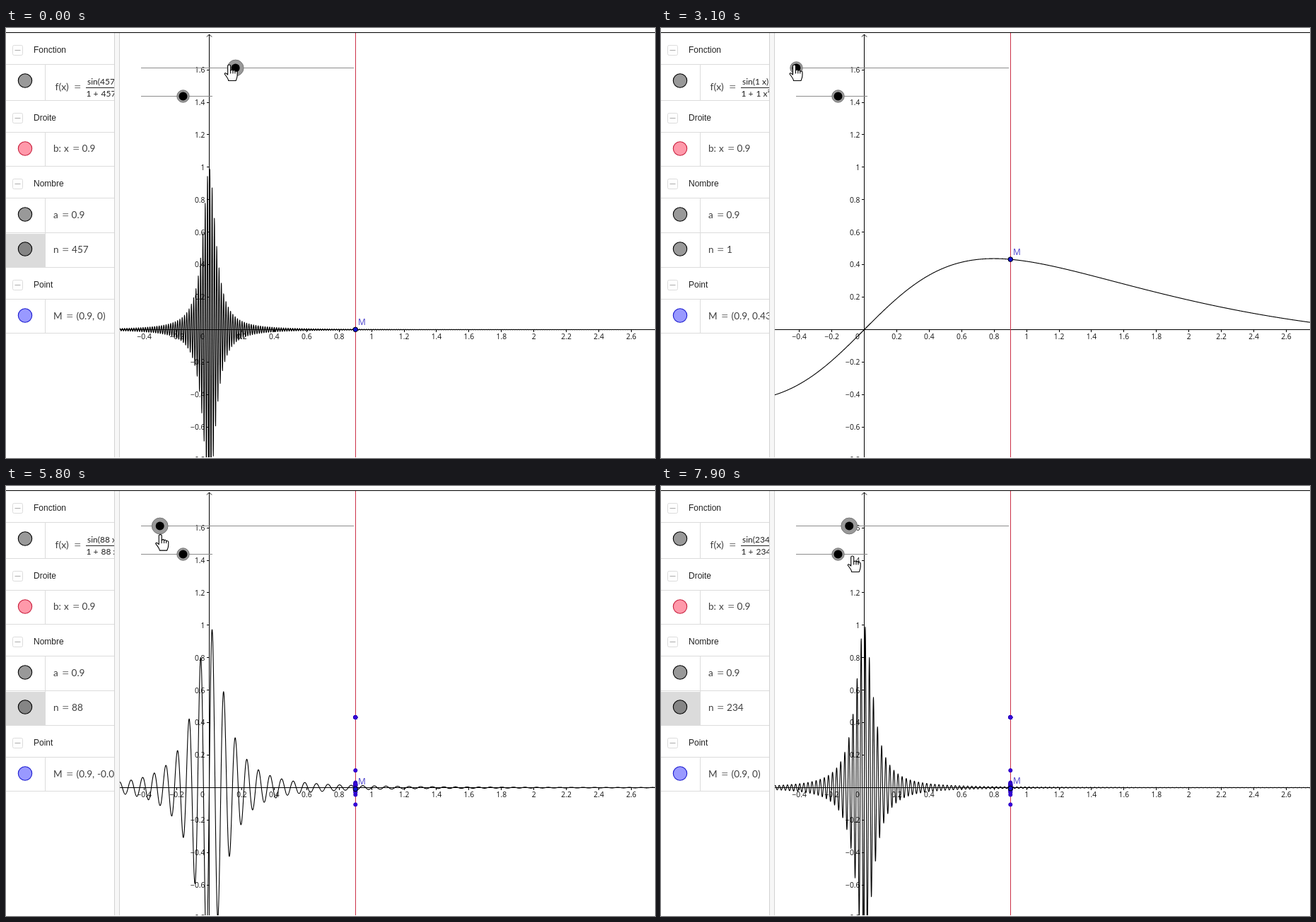
Write an HTML page that moves like this. It is 918 px wide and 608 px high and loops after 8000 ms.

```html
<!DOCTYPE html>
<html lang="fr">
<head>
<meta charset="utf-8">
<title>Suite de fonctions</title>
<style>
  html, body { margin: 0; width: 100%; height: 100%; overflow: hidden; background: #fff; }
  svg { display: block; width: 918px; height: 608px; }
  .title { font: 12px "Liberation Sans", Arial, sans-serif; fill: #222; }
  .math { font: 13.6px Lato, sans-serif; fill: #404040; }
  .frac { font: 12px Lato, sans-serif; fill: #222; }
  .eq { font-size: 18px; fill: #808080; }
  .tick { font: 10.3px "Open Sans", sans-serif; fill: #111; }
  .label { font: 12px "Open Sans", sans-serif; fill: #4a40cc; }
  .rule { stroke: #dcdcdc; fill: none; }
  .axis { stroke: #000; fill: none; }
  .rail { stroke: #8c8c8c; }
  .ring { fill: #999; stroke: #777; }
</style>
</head>
<body>
<svg viewBox="0 0 918 608">
  <defs>
    <clipPath id="paneClip"><rect y="7" width="153" height="600"/></clipPath>
    <clipPath id="plotClip"><rect x="161" y="7" width="757" height="600"/></clipPath>
  </defs>

  <g clip-path="url(#paneClip)">
    <rect id="mark" width="55" fill="#dbdbdb"/>
    <g id="rows"></g>
    <g class="math">
      <text x="69.5" y="88" font-size="14">f(x)</text><text class="eq" x="96" y="89">=</text>
      <text x="67" y="175">b:</text><text x="82" y="175">x</text>
      <text class="eq" x="94" y="176">=</text><text x="107.5" y="175">0.9</text>
      <text x="67" y="269">a</text><text class="eq" x="79" y="270">=</text><text x="92.5" y="269">0.9</text>
      <text x="67" y="318">n</text><text class="eq" x="79" y="319">=</text><text id="nText" x="93" y="318"></text>
      <text x="67" y="412">M</text><text class="eq" x="85" y="413">=</text>
      <text x="99.5" y="412">(0.9,</text><text id="mText" x="129" y="412"></text>
    </g>
    <path d="M113 84.5H153" stroke="#222"/>
    <g class="frac">
      <text id="num" x="115" y="79.5"></text>
      <text x="113.5" y="97">1</text><text x="123.5" y="97">+</text><text id="den" x="134.5" y="97"></text>
    </g>
  </g>

  <rect x="154" y="7" width="7" height="600" fill="#f7f7f7"/>
  <path d="M153.5 7V607M160.5 7V607" stroke="#d2d2d2"/>

  <g clip-path="url(#plotClip)">
    <g id="ticks"></g>
    <path class="axis" d="M161 426.5H918M287.5 9V607M284 12.5L287.5 9L291 12.5"/>
    <path d="M494.5 7V607" stroke="#cc3048"/>
    <path id="halo" fill="none" stroke="#cfcfcf" stroke-width="5"/>
    <path id="curve" fill="none" stroke="#000" stroke-width="1.1" stroke-linejoin="round"/>
    <g id="trace" fill="#3a00e0" stroke="#2400b4" stroke-width=".8"></g>
    <circle id="dot" cx="494.3" r="3.3" fill="#1010d8" stroke="#000"/>
    <text id="label" class="label" x="498">M</text>
    <path class="rail" d="M191 56.5H492M191 96.5H292"/>
    <circle id="ring" class="ring" cy="56.5"/>
    <circle id="knob" cy="56.5" r="6"/>
    <circle class="ring" cx="250.5" cy="96.5" r="8.7"/>
    <circle cx="250.5" cy="96.5" r="6"/>
  </g>

  <path d="M0 6.5H918" stroke="#000"/>
  <g id="hand" stroke="#000" stroke-width="1.1" stroke-linejoin="round" stroke-linecap="round">
    <path fill="#fff" d="M-2 14V2Q-2 0 0 0T2 2V8Q5.3 6 5.3 8.2Q8.3 7 8.3 9.2Q11.5 8.5 11.5 11V15Q11.5 18 9.5 22.5H-1Q-1 20 -6.5 13Q-6 10 -2 14Z"/>
    <path fill="none" d="M2 8V12M5.3 8.2V12M8.3 9.2V12"/>
  </g>
</svg>

<script>
const $ = id => document.getElementById(id);
const X0 = 287.5, Y0 = 426.5, UNIT = 229.6, A = 0.9;
const STEP = 100, STEPS = 80;
const RELEASE = 11, CLEAR = 24, GRAB = 33; // first drag ends, trace is wiped, second drag begins

// second drag: [step, n], straight between the points
const drag = [[32, 1], [36, 91], [39, 31], [43, 8], [44, 4], [46, 31], [48, 31], [57, 88], [59, 88], [69, 177], [70, 177]];
// free hand between the drags: [step, x, y]
const walk = [[11, 184, 53], [13, 138, 86], [16, 140, 87], [17, 117, 77], [20, 117, 77], [24, 391, 397], [29, 189, 52]];

function along(keys, s, col) {
  const i = Math.max(1, keys.findIndex(k => k[0] >= s));
  const a = keys[i - 1], b = keys[i];
  return a[col] + (b[col] - a[col]) * (s - a[0]) / (b[0] - a[0]);
}

function nAt(s) {
  if (s < RELEASE) return Math.floor(1 + 456 * (1 - ((s + 1) / 12) ** 1.7) ** 2.1);
  if (s < GRAB) return 1;
  if (s <= 70) return Math.round(along(drag, s, 1));
  return Math.round(177 + 72 * ((s - 70) / 9) ** 2);
}

const knobAt = s => 191.5 + (nAt(s) - 1) * 0.3013;

function handAt(s) {
  if (s < RELEASE) return [knobAt(s) - 9, 52];
  if (s < 29) return [along(walk, s, 1), along(walk, s, 2)];
  const drift = Math.max(0, (s - 39) / 40);
  return [knobAt(s) - 3 + 7.5 * drift, 52 + 47 * drift ** 1.4];
}

const f = (n, x) => Math.sin(n * x) / (1 + n * x * x);
const py = v => Y0 - v * UNIT;
const yM = s => py(f(nAt(s), A));

function set(id, attrs) {
  for (const k in attrs) $(id).setAttribute(k, attrs[k]);
}

function curvePath(n) {
  let d = "";
  for (let x = 160; x <= 919; x += 0.25)
    d += (d ? "L" : "M") + x + " " + py(f(n, (x - X0) / UNIT)).toFixed(2);
  return d;
}

function buildPane() {
  const groups = [["Fonction", 51], ["Droite", 48], ["Nombre", 49, 49], ["Point", 48]];
  const tints = { Droite: ["#ff99aa", "#c81e3c"], Point: ["#9999ff", "#1a1ad0"] };
  let h = "", y = 6.5;
  for (const [name, ...heights] of groups) {
    const mid = y + 24.5;
    h += `<rect class="rule" x="9.5" y="${mid - 6.5}" width="14" height="14" rx="2"/>` +
      `<path d="M12.5 ${mid + .5}H20.5" stroke="#aaa"/><text class="title" x="39" y="${mid + 4}">${name}</text>`;
    y += 45;
    const [fill, line] = tints[name] || ["#999", "#000"];
    heights.forEach((height, i) => {
      h += `<path class="rule" d="M0 ${y}H153M55.5 ${y}v${height}M0 ${y + height}H153"/>` +
        `<circle id="${name + i}" cx="27" cy="${y + 23}" r="9.7" fill="${fill}" stroke="${line}" stroke-width="1.1"/>`;
      y += height;
    });
  }
  $("rows").innerHTML = h;
}

function buildTicks() {
  const name = k => String(k / 5).replace("-", "−");
  let h = '<text class="tick" x="275" y="440">0</text>', d = "";
  for (let k = -4; k <= 13; k++) {
    if (!k) continue;
    const x = X0 + k * UNIT / 5, y = py(k / 5);
    if (k >= -2) {
      h += `<text class="tick" x="${x}" y="440" text-anchor="middle">${name(k)}</text>`;
      d += `M${Math.floor(x) + .5} 427v3`;
    }
    if (k <= 8) {
      h += `<text class="tick" x="281.5" y="${y + 3.8}" text-anchor="end">${name(k)}</text>`;
      d += `M284 ${Math.floor(y) + .5}h3`;
    }
  }
  $("ticks").innerHTML = h + `<path class="axis" d="${d}"/>`;
}

function select(s) {
  const onN = s < 16 || s >= GRAB, onF = s >= 16 && s < 23;
  set("mark", { y: onF ? 52 : 291, height: onF ? 50 : onN ? 48 : 0 });
  set("Fonction0", { fill: onF ? "#858585" : "#999" });
  set("Nombre1", { fill: onN ? "#858585" : "#999" });
  set("halo", { visibility: onF ? "visible" : "hidden" });
  set("ring", { r: onN ? 11.4 : 8.7 });
}

function draw(s) {
  const n = nAt(s), shown = nAt(s - 1); // the list lags one step behind the plot
  const d = curvePath(n), cx = knobAt(s);
  select(s);
  set("curve", { d });
  set("halo", { d });

  let dots = "";
  for (let i = s < CLEAR ? 0 : CLEAR; i <= s; i++) dots += `<circle cx="494.3" cy="${yM(i)}" r="2.6"/>`;
  $("trace").innerHTML = dots;
  set("dot", { cy: yM(s) });
  set("label", { y: yM(s) - 6 });

  set("knob", { cx });
  set("ring", { cx });
  $("nText").textContent = shown;
  $("mText").textContent = (+f(shown, A).toFixed(2) || 0) + ")";
  $("num").textContent = `sin(${shown} x)`;
  $("den").textContent = `${shown} x²`;
  set("hand", { transform: `translate(${handAt(s)})` });
}

buildPane();
buildTicks();
const start = performance.now();
let last = -1;
function tick() {
  const s = Math.floor((performance.now() - start) / STEP) % STEPS;
  if (s !== last) draw(last = s);
  requestAnimationFrame(tick);
}
tick();
</script>
</body>
</html>
```
